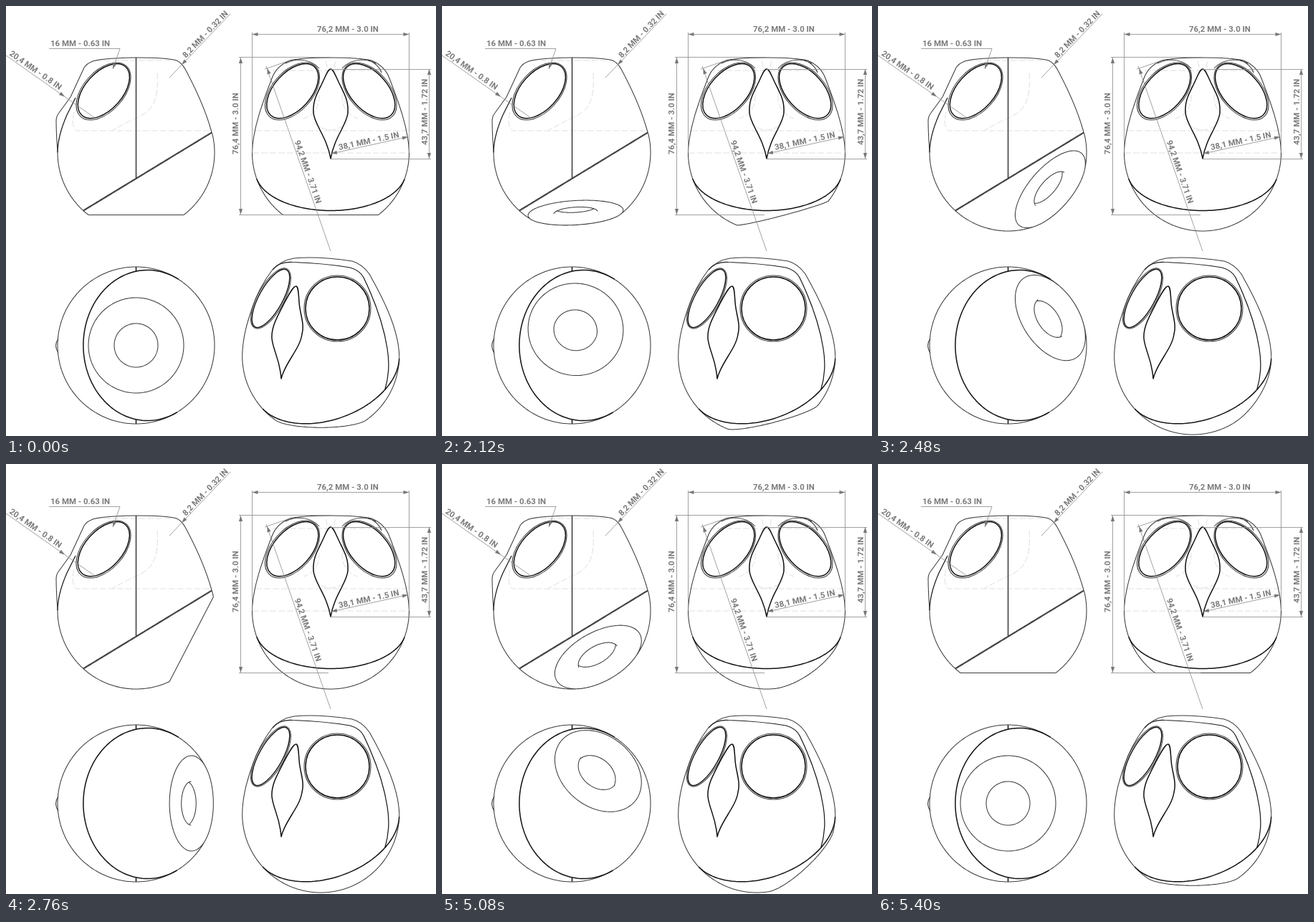
An HTML page for the animation above (5.44 s loop, 600 px wide and 600 px high).

```html
<!DOCTYPE html>
<html lang="en">
<head>
<meta charset="utf-8">
<title>Rotating base drawing</title>
<style>
html, body { margin: 0; width: 100%; height: 100%; overflow: hidden; background: #fff; }
svg { display: block; width: 100%; height: 100%; }
path, ellipse, circle { fill: none; stroke-linejoin: round; }
.thin { stroke: #3c3c3c; stroke-width: 1.05; }
.bold { stroke: #111; stroke-width: 1.5; }
.edge { stroke: #1c1c1c; stroke-width: 1.25; }
.hint { stroke: #e0e0e0; stroke-width: 1; stroke-dasharray: 9 3; }
.dim { stroke: #8a8a8a; stroke-width: .8; }
.arrow { fill: #777; }
text { font: 700 11.4px Roboto, Arial, sans-serif; fill: #7c7c7c; }
</style>
</head>
<body>
<svg viewBox="0 0 600 600">
  <defs>
    <g id="eye">
      <ellipse class="thin" rx="47.5" ry="28"/>
      <ellipse class="bold" rx="45.5" ry="26" cx=".5"/>
    </g>
  </defs>

  <g class="hint">
    <path d="M125 76H232M211 93C213 130 207 146 180 157Q165 164 148 174M95 148Q90 165 98 174H286"/>
    <path d="M372 90H536M348 174H558M344 205H562M430 163Q453 183 476 163M446 77Q450 84 446 100M460 77Q456 84 460 100M437 100V128Q436 150 415 157M469 100V128Q470 150 491 157"/>
  </g>

  <g class="thin">
    <path class="edge" d="M72 204.500C72 186 78 168 85 152L97 128"/>
    <path d="M72 204.500Q70 176 70 160Q70 154 74 149L90 127L109 86Q112 81 119 78Q128 73 181 72Q224 72 238 76Q245 79 250 88Q276 136 287 176"/>
    <path class="edge" d="M181.500 72V240"/>
    <path d="M343.500 204.500C344 172 359 132 371 101Q377 84 396 76Q414 72 453 72T510 76Q529 84 535 101C547 132 562 172 562.500 204.500"/>
    <path d="M390 80Q400 75 410 75Q427 76 437 87M516 80Q506 75 496 75Q479 76 469 87M505 75Q520 81 524 93"/>
    <path d="M329.700 488.500C330 462 337 440 344 420Q353 393 371 369Q383 355 402 352Q436 349 483 356Q497 360 507 374C517 392 548 445 548.700 488.500"/>
    <path class="edge" d="M372 368Q382 356 400 357.500Q445 359 480 365Q494 369 499 379C515 412 527 446 532 478Q537 508 528.700 535.500"/>
    <path d="M73 464Q66 474 73 484"/>
    <path class="bold" d="M181.500 364V370M181.500 577V583"/>
  </g>

  <use href="#eye" transform="translate(136 119) rotate(-48)"/>
  <use href="#eye" transform="translate(399.500 119) rotate(-48)"/>
  <use href="#eye" transform="translate(507 119) rotate(-132)"/>
  <g transform="translate(369.500 408) rotate(-61)">
    <ellipse class="thin" rx="47" ry="18.500"/>
    <ellipse class="bold" rx="45.500" ry="16.500"/>
  </g>
  <ellipse class="thin" cx="462.500" cy="422" rx="46.500" ry="46"/>
  <ellipse class="bold" cx="462.500" cy="422" rx="44.500" ry="44"/>

  <path class="bold" d="M453 88C449 88 446 98 440 110C433 124 428 133 429 149C430 165 448 183 453 213C458 183 476 165 477 149C478 133 473 124 466 110C460 98 457 88 453 88Z"/>
  <path class="bold" d="M405 391C401 390 394 404 388 415C377 436 370 449 371 464C373 482 382 492 384 520C389 498 410 479 413 458C417 443 410 430 409 413C408 400 408 392 405 391Z"/>

  <g id="moving"></g>

  <g id="dims">
    <path class="dim" d="M343.500 37V204M562.500 37V204M325 71.500H453M325 291.500H450M453 88.500H593M453 213.500H593"/>
    <path class="dim" d="M60 59.500H159L149 88M0 69L128 159M228 100L313 11M363 84L453 342M361 88L396 76"/>
    <text x="62" y="56">16 MM - 0.63 IN</text>
    <text transform="translate(4 68) rotate(35)">20,4 MM - 0.8 IN</text>
    <text transform="translate(251 73) rotate(-46)">8,2 MM - 0.32 IN</text>
    <text x="434" y="36">76,2 MM - 3.0 IN</text>
    <text transform="translate(324 207) rotate(-90)">76,4 MM - 3.0 IN</text>
    <text transform="translate(587.500 194) rotate(-90)">43,7 MM - 1.72 IN</text>
    <text transform="translate(465 201) rotate(-12)">38,1 MM - 1.5 IN</text>
    <text transform="translate(402.500 189) rotate(70.800)">94,2 MM - 3.71 IN</text>
  </g>
</svg>
<script>
const R = 109.5, CUT = 87, RIM = 30.5, DEPTH = 8.5, JOINT = 31;
const CUT_R = Math.sqrt(R * R - CUT * CUT), JOINT_R = Math.sqrt(R * R - JOINT * JOINT);
const RAD = Math.PI / 180, TILT = 31.3 * RAD, YAW = 30 * RAD, PITCH = 13 * RAD;
const { sin, cos, sqrt, floor, min, max } = Math;

const dot = (a, b) => a[0] * b[0] + a[1] * b[1] + a[2] * b[2];
const mix = (a, s, b, t) => a.map((q, i) => q * s + b[i] * t);
const cross = (a, b) => [a[1] * b[2] - a[2] * b[1], a[2] * b[0] - a[0] * b[2], a[0] * b[1] - a[1] * b[0]];
const unit = a => { const l = sqrt(dot(a, a)) || 1; return a.map(q => q / l); };

// Axes in space: x to the back, y down, z to the side. r and w span the page, v points at the viewer.
const views = [
  { o: [181.5, 204.5], r: [1, 0, 0], w: [0, 1, 0], v: [0, 0, 1], from: -14.8, to: 180, seam: '#444' },
  { o: [453, 204.5], r: [0, 0, 1], w: [0, 1, 0], v: [-1, 0, 0], from: 0, to: 180 },
  { o: [181.5, 473.5], r: [1, 0, 0], w: [0, 0, -1], v: [0, 1, 0], from: 0, to: 360 },
  { o: [439.2, 488.5], from: 0, to: 180,
    r: [sin(YAW), 0, cos(YAW)],
    w: [-sin(PITCH) * cos(YAW), cos(PITCH), sin(PITCH) * sin(YAW)],
    v: [-cos(PITCH) * cos(YAW), -sin(PITCH), cos(PITCH) * sin(YAW)] }
];

const svgNode = (parent, name, attrs) => {
  const node = document.createElementNS('http://www.w3.org/2000/svg', name);
  for (const key in attrs) node.setAttribute(key, attrs[key]);
  return parent.appendChild(node);
};

function trace(view, points) {
  let pen = 'M';
  return points.map(p => {
    if (!p) { pen = 'M'; return ''; }
    const s = pen + (view.o[0] + dot(p, view.r)).toFixed(2) + ' ' + (view.o[1] + dot(p, view.w)).toFixed(2);
    pen = 'L';
    return s;
  }).join('');
}

function ring(n, dist, radius, seen = () => true) {
  const a = unit(cross(n, [.31, .17, .93])), b = cross(n, a), points = [];
  for (let deg = 0; deg <= 360; deg += 2) {
    const e = mix(a, cos(deg * RAD), b, sin(deg * RAD));
    const p = mix(n, dist, e, radius);
    points.push(seen(e, p) ? p : null);
  }
  return points;
}

// Outline of the ball with one cap cut off, by its farthest point in each direction.
function outline(view, n) {
  const points = [], count = 360;
  for (let i = 0; i <= count; i++) {
    const phi = (view.from + (view.to - view.from) * i / count) * RAD;
    const d = mix(view.r, cos(phi), view.w, sin(phi)), k = dot(d, n);
    points.push(R * k <= CUT ? mix(d, R, d, 0) : mix(n, CUT, unit(mix(d, 1, n, -k)), CUT_R));
  }
  return points;
}

function baseShape(view, n) {
  const facing = dot(n, view.v);
  let d = trace(view, outline(view, n));
  if (facing < .01) return d;
  d += trace(view, ring(n, CUT, CUT_R));
  d += trace(view, ring(n, CUT, RIM, e => dot(e, view.v) >= -1e-9));
  d += trace(view, ring(n, CUT - DEPTH, RIM, e => {
    const offset = mix(mix(e, RIM, n, -DEPTH), 1, view.v, DEPTH / facing);
    return dot(offset, offset) <= RIM * RIM + .01;
  }));
  return d;
}

const axis = [sin(TILT), cos(TILT), 0];
const layer = document.getElementById('moving');
for (const view of views) {
  view.path = svgNode(layer, 'path', { class: 'thin' });
  const seam = svgNode(layer, 'path', { class: 'bold' });
  seam.setAttribute('d', trace(view, ring(axis, JOINT, JOINT_R, (e, p) => dot(p, view.v) >= 0)));
  if (view.seam) seam.style.cssText = `stroke: ${view.seam}; stroke-width: 2.2`;
}

const dims = document.getElementById('dims');
function arrow(x, y, angle) {
  svgNode(dims, 'path', { class: 'arrow', d: 'M0 0L-8 -2.6V2.6Z', transform: `translate(${x} ${y}) rotate(${angle})` });
}
function dimension(x1, y1, x2, y2) {
  const angle = Math.atan2(y2 - y1, x2 - x1) / RAD;
  svgNode(dims, 'path', { class: 'dim', d: `M${x1} ${y1}L${x2} ${y2}` });
  arrow(x1, y1, angle + 180);
  arrow(x2, y2, angle);
}
dimension(343.5, 39.5, 562.5, 39.5);
dimension(327.5, 72, 327.5, 291);
dimension(590.5, 88, 590.5, 213);
dimension(454, 206, 561, 182.5);
arrow(149, 88, 109);
arrow(82, 126.5, 35);
arrow(245, 82, 134);
arrow(364.5, 87, 251);

function angleAt(t) {
  if (t < 2000 || t >= 5400) return 0;
  if (t >= 4800) return 180 * max(0, 1 - (floor((t - 4800) / 40) + 1.3) / 16);
  const p = min(1, (floor((t - 2000) / 40) + 1) / 20);
  return 180 * (.62 * p + .38 * p * p * (3 - 2 * p));
}

let shown;
function frame() {
  const angle = angleAt(performance.now() % 5440);
  if (angle !== shown) {
    shown = angle;
    const s = axis[0], c = axis[1], turn = cos(angle * RAD);
    const n = [c * s * (1 - turn), c * c + s * s * turn, s * sin(angle * RAD)];
    for (const view of views) view.path.setAttribute('d', baseShape(view, n));
  }
  requestAnimationFrame(frame);
}
frame();
</script>
</body>
</html>
```
